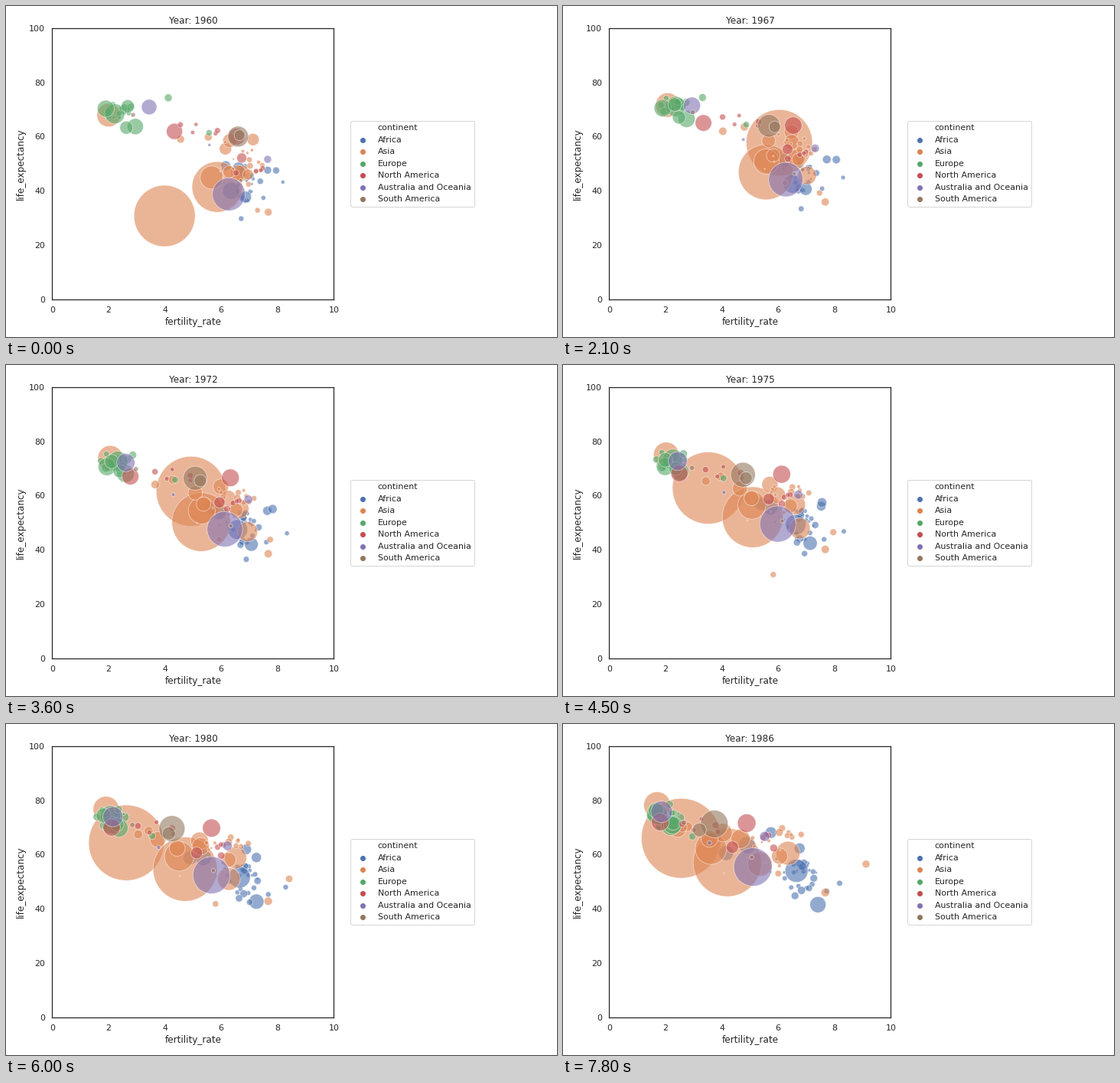
A matplotlib script for the animation above (8000 ms loop, 720x432 px).

```python
import numpy as np
import matplotlib.pyplot as plt
from matplotlib.animation import FuncAnimation
from matplotlib.lines import Line2D

WIDTH, HEIGHT, DPI = 720, 432, 72
FIRST, LAST = 1960, 1986
STEPS_PER_YEAR = 3
INK = "0.15"
COLORS = {
    "Africa": "#4c72b0",
    "Asia": "#dd8452",
    "Europe": "#55a868",
    "North America": "#c44e52",
    "Australia and Oceania": "#8172b3",
    "South America": "#937860",
}

rng = np.random.default_rng(12)
years = np.arange(FIRST, LAST + 1)
t = (years - FIRST) / (LAST - FIRST)
arch = 4 * t * (1 - t)
tracks, colors = [], []


def mix(ends):
    return ends[0] + (ends[1] - ends[0]) * t


def pulse(year, width):
    return np.exp(-((years - year) / width) ** 2)


def add(continent, fertility, life, radii):
    tracks.append(np.stack([fertility, life, mix(radii)], axis=1))
    colors.append(COLORS[continent])


def bubble(continent, radii, start, end, bend=0, lift=1.2, crisis=0):
    """Move from start to end; bend and lift are the offsets at mid-time."""
    fertility, life = zip(start, end)
    add(continent, mix(fertility) + bend * arch,
        mix(life) + lift * arch - crisis, radii)


def swarm(continent, count, sizes, x, y, dx, dy):
    """Small bubbles drifting by random amounts within the given ranges."""
    for _ in range(count):
        x0, y0, radius = rng.uniform(*x), rng.uniform(*y), rng.uniform(*sizes)
        end = x0 + rng.uniform(*dx), y0 + rng.uniform(*dy)
        bubble(continent, (radius, 1.2 * radius), (x0, y0), end)


def giant():
    """Rebound from famine, then a steep fall of the birth rate."""
    age = years - FIRST
    fertility = 2.55 + 3.6 / (1 + np.exp((years - 1973.2) / 1.8))
    fertility -= 2.57 * pulse(1960.5, 1.2)
    add("Asia", fertility, 59 + 0.27 * age - 28.3 * np.exp(-age / 3.2), (40, 52))


C = "Africa"
swarm(C, 18, (1, 2.8), (6.1, 7.2), (36, 49), (-0.6, 0.3), (8, 14))
swarm(C, 12, (2.5, 4.5), (6.7, 7.5), (36, 50), (-0.3, 0.3), (7, 12))
bubble(C, (11, 15), (6.35, 40), (6.65, 54), 0.1, crisis=13 * pulse(1969, 1.5))
bubble(C, (7.5, 10.5), (6.87, 37.7), (7.41, 42), -0.05, 2.3,
       crisis=8 * pulse(1984, 1.2))
bubble(C, (8, 11), (6.62, 48.3), (4.9, 63.5), 0.1, -1.5)
bubble(C, (6.5, 9.5), (6.16, 49.2), (4.15, 60.5), 0.4)
bubble(C, (5, 7), (7.65, 47.6), (6.76, 62.3), 0.4, 0)
bubble(C, (4.5, 7.5), (7.95, 47.5), (5.74, 68.1), 0.9, -2)
bubble(C, (2.5, 3.8), (8.19, 43.2), (8.18, 49.4), 0.15, 0)
bubble(C, (3.5, 4.3), (6.71, 29.7), (7.1, 47.6), lift=-1.5)

C = "Asia"
giant()
bubble(C, (33, 44.5), (5.86, 41.4), (4.19, 57.1), 0.2, 1.6)
bubble(C, (15, 20.5), (5.66, 44.9), (3.61, 62.2), 0.6, 1.6)
bubble(C, (15.3, 17.5), (2.0, 67.9), (1.7, 78.2), 0.2)
bubble(C, (10.5, 16), (6.73, 46.5), (5.35, 56.5), 0.85, -4.5)
bubble(C, (10.5, 15.5), (6.6, 46.5), (6.35, 60.5), 0.15, 2.2)
bubble(C, (8, 12.5), (7.13, 58.9), (4.66, 65.8))
bubble(C, (8, 11), (6.15, 55.5), (2.43, 69.5), 0.65, -1)
bubble(C, (9, 12), (6.3, 58.5), (4.04, 68.1), 1, -4)
bubble(C, (8, 11), (6.28, 47), (3.56, 65.8), 0.35)
bubble(C, (7, 10.5), (6.95, 46), (6.05, 59.4), lift=2.5)
bubble(C, (5, 6), (5.54, 59.8), (2.79, 70.3))
bubble(C, (5, 6), (4.56, 59), (2.6, 70), lift=0)
bubble(C, (5, 5.5), (7.67, 32.1), (7.67, 46), lift=0)
bubble(C, (3.5, 5), (7.29, 32.8), (9.12, 56.5), -0.4, 0)
bubble(C, (3.6, 4.2), (6.97, 42.4), (6.0, 53), -0.6, -3,
       crisis=28 * pulse(1977, 2.5))
swarm(C, 6, (2.5, 4.5), (7, 7.6), (46, 54), (-1, -0.6), (17, 20))
swarm(C, 10, (0.5, 2.3), (5.4, 7.1), (44, 60), (-2, -0.3), (7, 13))

C = "Europe"
swarm(C, 16, (1.5, 5.5), (1.95, 2.8), (67, 72), (-0.7, -0.2), (2.5, 5))
bubble(C, (10.5, 12.5), (2.95, 63.7), (2.19, 70.6), 0)
bubble(C, (13, 13.5), (2.22, 68.4), (1.7, 75), 0.35)
bubble(C, (11, 12), (1.9, 70.3), (2.25, 71), -0.12, 0)
bubble(C, (8.5, 9), (2.63, 63.3), (2.27, 71.5), -0.07, 2)
bubble(C, (8.5, 10), (2.68, 71.2), (1.66, 76.3), -0.1, -1)
bubble(C, (5, 5), (4.12, 74.3), (2.14, 78.5), -0.35, -1.3)
bubble(C, (4, 4.7), (5.57, 61.4), (2.95, 66.7), lift=2)

C = "North America"
bubble(C, (10.5, 11.5), (4.34, 61.9), (1.81, 72), -0.4, 0.5)
bubble(C, (11, 12), (6.55, 60), (4.88, 71.6), 0.55)
bubble(C, (6.5, 8), (6.73, 52.1), (4.37, 62.7), 0.3, 0.5)
bubble(C, (4, 5), (6.53, 46.6), (5.84, 62.4))
swarm(C, 5, (2.2, 4), (4.4, 5.9), (61, 65), (-2.3, -1.7), (6, 9))
swarm(C, 3, (2.5, 3.5), (7.1, 7.5), (47, 52), (-2, -1.7), (18, 20))

C = "Australia and Oceania"
bubble(C, (21.5, 25), (6.27, 38.7), (5.1, 55.4), 0.4)
bubble(C, (10, 14), (3.44, 70.9), (1.86, 75.8), -0.1, -1)
bubble(C, (5, 6.5), (7.65, 51.6), (5.52, 66.7), 0.3, 0)
bubble(C, (2, 2.8), (5.58, 56.9), (3.56, 64.3), -0.35, 0)

C = "South America"
bubble(C, (13.5, 18), (6.6, 60), (3.73, 71.3), -0.2)
bubble(C, (7, 9), (6.65, 60.5), (3.2, 69.1), 0.2, 1)
bubble(C, (3, 3.4), (2.87, 68), (2.65, 71.8), 0.2, 0)
bubble(C, (2.4, 2.8), (6.7, 43.8), (5.06, 59), 0.4, -2)

bubbles = np.array(tracks)

plt.rcParams.update({
    "font.family": "DejaVu Sans",
    "text.color": INK, "axes.labelcolor": INK, "axes.edgecolor": INK,
    "axes.linewidth": 1.25,
})
fig = plt.figure(figsize=(WIDTH / DPI, HEIGHT / DPI), dpi=DPI,
                 facecolor="white")
left, right, bottom, top = 60.46, 428.4, 49.46, 403.04
ax = fig.add_axes([left / WIDTH, bottom / HEIGHT,
                   (right - left) / WIDTH, (top - bottom) / HEIGHT])
ax.set(xlim=(0, 10), ylim=(0, 100))
ax.set_xlabel("fertility_rate", fontsize=12)
ax.set_ylabel("life_expectancy", fontsize=12)
ax.tick_params(length=0, pad=9.5, labelsize=11, labelcolor=INK)
title = ax.set_title("", fontsize=12, pad=6)
dots = ax.scatter(bubbles[:, 0, 0], bubbles[:, 0, 1], c=colors, alpha=0.6,
                  edgecolors="white", linewidths=0.75)

handles = [Line2D([], [], linestyle="none")]
handles += [ax.scatter([], [], s=36, color=color, linewidths=1)
            for color in COLORS.values()]
ax.legend(handles, ["continent", *COLORS], loc="center left", fontsize=11,
          bbox_to_anchor=(1.06, 0.5), borderaxespad=0, scatterpoints=1)


def update(step):
    index = min(step // STEPS_PER_YEAR, LAST - FIRST)
    now = bubbles[:, index]
    dots.set_offsets(now[:, :2])
    dots.set_sizes((2 * now[:, 2]) ** 2)
    title.set_text(f"Year: {FIRST + index}")
    return dots, title


animation = FuncAnimation(fig, update, frames=80, interval=100,
                          repeat=True, repeat_delay=0)
plt.show()
```
